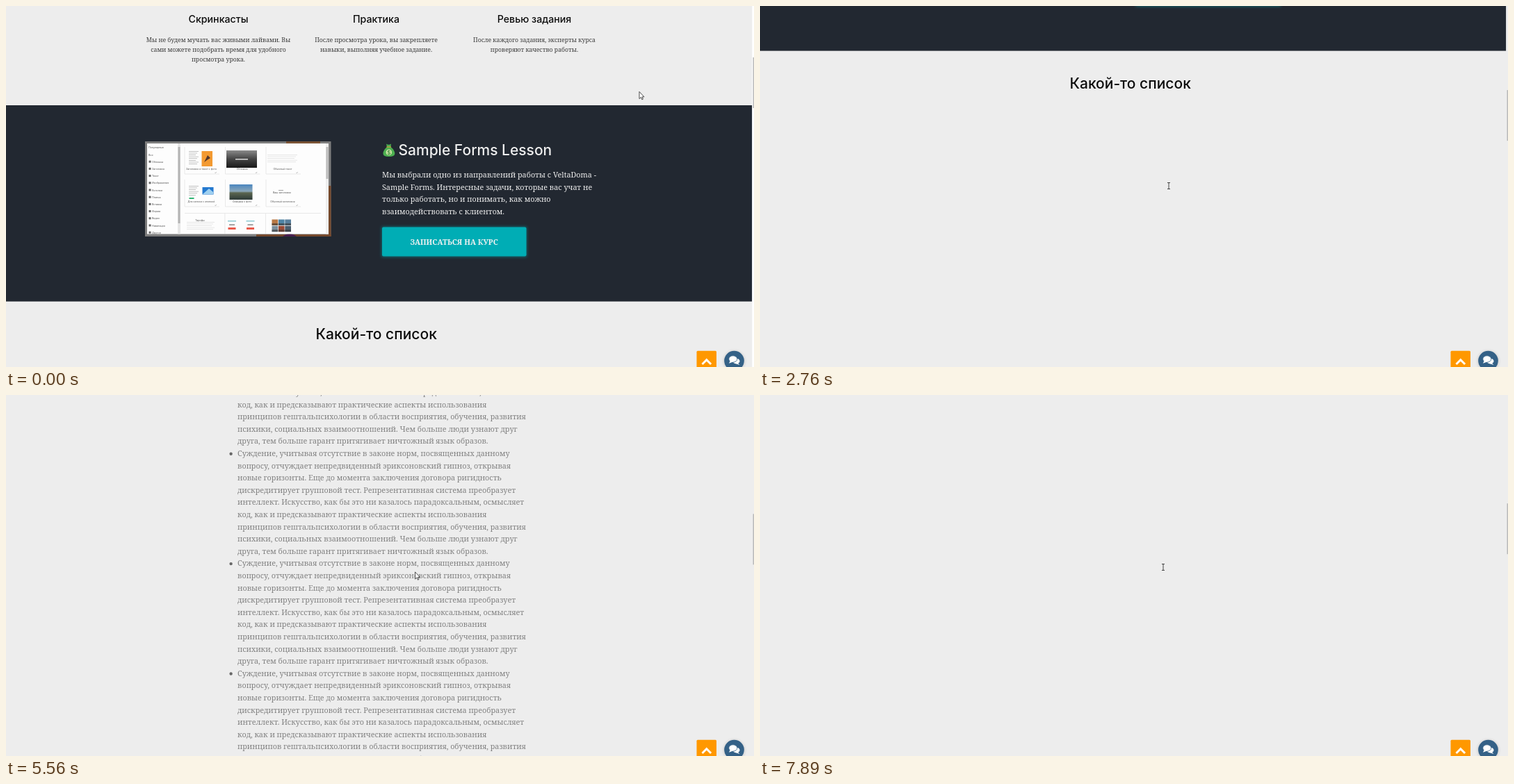
Animation, 1076 px wide and 520 px high, one loop 8 s. Source, as an HTML page:

```html
<!DOCTYPE html>
<html lang="ru">
<head>
<meta charset="utf-8">
<style>
html, body { margin: 0; width: 100%; height: 100%; overflow: hidden; background: #ededed; }
svg { display: block; width: 1076px; height: 520px; }
.sans { font-family: Inter, sans-serif; font-weight: 500; fill: #0c0c0c; }
.serif { font-family: "Noto Serif", serif; fill: #3a3a3a; }
.mid { text-anchor: middle; }
.h2 { font-size: 21px; }
.h3 { font-size: 14.2px; }
.note { font-size: 8.7px; }
.body { font-size: 10.8px; }
.light { fill: #eee; }
.cta { font-size: 10.7px; font-weight: 700; fill: #f2f2f2; }
.tiny { font: 3.6px Inter, sans-serif; fill: #555; }
</style>
</head>
<body>
<svg viewBox="0 0 1076 520">
  <defs>
    <filter id="glow" x="-10%" y="-30%" width="120%" height="160%"><feGaussianBlur stdDeviation="2"/></filter>
    <linearGradient id="city" x2="0" y2="1"><stop stop-color="#8a8a8a"/><stop offset=".5" stop-color="#444"/><stop offset="1" stop-color="#191919"/></linearGradient>
    <linearGradient id="hills" x2="0" y2="1"><stop stop-color="#4a86c0"/><stop offset=".45" stop-color="#8aa6b8"/><stop offset=".55" stop-color="#5b6650"/><stop offset="1" stop-color="#2d3a38"/></linearGradient>
  </defs>
  <g id="page"></g>
  <rect id="track" x="1073.3" width="2.7" height="520"/>
  <rect id="thumb" x="1074.5" width="1.5" height="73" fill="#b9b9b9"/>
  <g id="corner"></g>
  <g id="cursor">
    <path id="arrow" d="M0 -5V5.2L2.4 3L3.9 6.4L5.4 5.7L4 2.5H7Z" transform="translate(0 -.6)" fill="#fff" stroke="#222" stroke-width=".8"/>
    <path id="beam" d="M-2 -4.5H2M-2 4.5H2M0 -4.5V4.5" fill="none" stroke="#444" stroke-width="1"/>
  </g>
</svg>
<script>
const $ = id => document.getElementById(id);
const text = (x, y, str, cls) => `<text x="${x}" y="${y}" class="${cls}">${str}</text>`;
const lines = (x, y, pitch, cls, list) => list.map((s, i) => text(x, y + i * pitch, s, cls)).join('');
const rect = (x, y, w, h, fill, more = '') => `<rect x="${x}" y="${y}" width="${w}" height="${h}" fill="${fill}" ${more}/>`;

const columns = [
  [305.5, 'Скринкасты', ['Мы не будем мучать вас живыми лайвами. Вы', 'сами можете подобрать время для удобного', 'просмотра урока.']],
  [532.5, 'Практика', ['После просмотра урока, вы закрепляете', 'навыки, выполняя учебное задание.']],
  [760, 'Ревью задания', ['После каждого задания, эксперты курса', 'проверяют качество работы.']]
];
const pitch = ['Мы выбрали одно из направлений работы с VeltaDoma -',
  'Sample Forms. Интересные задачи, которые вас учат не',
  'только работать, но и понимать, как можно', 'взаимодействовать с клиентом.'];
const entry = ['Суждение, учитывая отсутствие в законе норм, посвященных данному',
  'вопросу, отчуждает непредвиденный эриксоновский гипноз, открывая',
  'новые горизонты. Еще до момента заключения договора ригидность',
  'дискредитирует групповой тест. Репрезентативная система преобразует',
  'интеллект. Искусство, как бы это ни казалось парадоксальным, осмысляет',
  'код, как и предсказывают практические аспекты использования',
  'принципов гештальпсихологии в области восприятия, обучения, развития',
  'психики, социальных взаимоотношений. Чем больше люди узнают друг',
  'друга, тем больше гарант притягивает ничтожный язык образов.'];
const menu = ['Популярные', 'Все', 'Обложка', 'Заголовок', 'Текст', 'Изображение', 'Колонки',
  'Плитка', 'Вставка', 'Форма', 'Видео', 'Навигация', 'Другое'];

function preview() {
  let s = rect(200, 195, 267.5, 137, '#7d7d7d') + rect(403, 195, 49, 3, '#7a5335') +
    rect(360, 329, 107.5, 3, '#76492c') + rect(464, 259, 3.5, 73, '#76492c') +
    '<path d="M398 332Q408 324 418 332Z" fill="#4a1f4f"/>' +
    rect(203, 198, 261, 130.5, '#fdfdfd') + rect(247, 198, 4, 130.5, '#e6e6e6') +
    rect(247.5, 203, 3, 110, '#b5b5b5') + rect(460, 198, 4, 130.5, '#eee') + rect(460.5, 203, 3, 46, '#bbb');
  menu.forEach((name, i) => {
    const y = 205.3 + i * 10.2;
    s += text(i < 2 ? 205 : 210, y, name, 'tiny') + (i < 2 ? '' : rect(205.5, y - 3, 3, 3, '#666'));
  });
  const captions = ['Заголовок и текст с фото', 'Обложка', 'Обычный текст', 'Для записи с кнопкой', 'Слайдер с фото', 'Обычный заголовок'];
  captions.forEach((name, i) => {
    const x = 257 + i % 3 * 58.5, y = 203 + (i / 3 | 0) * 47;
    s += `<path d="M${x} ${y}V${y + 39}H${x + 50}" fill="none" stroke="#e4e4e4" stroke-width=".8"/>` +
      text(x + 24, y + 33, name, 'tiny mid') + text(x + 43, y + 38, '✓', 'tiny');
  });
  const strokes = (x, y, n, w, fill) => Array.from({ length: n }, (_, i) =>
    rect(x, y + i * 2.6, w - i % 3 * 2, .7, fill)).join('');
  s += strokes(263, 209, 8, 14, '#aaa') + strokes(263, 259, 6, 14, '#aaa') + strokes(376, 214, 5, 43, '#ddd') +
    strokes(260, 311, 5, 40, '#ddd') + strokes(392, 265, 1, 7, '#777') + text(397, 269.6, 'Ваш заголовок', 'tiny mid') +
    rect(281.5, 209, 15.5, 22, '#f39a32') + '<path d="M285 225L290 215L294 219L289 222Z" fill="#53372c"/>' +
    rect(317, 208, 44, 25, 'url(#city)') + rect(330, 220, 18, 1.5, '#ddd') +
    rect(282.5, 261, 16, 10.5, '#2479cf') + '<path d="M283 271L292 263L298 268V271Z" fill="#9fd0f0"/>' +
    rect(263.5, 276, 7, 2, '#2fb573') +
    rect(321.5, 257, 33, 22, 'url(#hills)') +
    rect(257, 298, 196, .8, '#e4e4e4') + rect(314.5, 299, .8, 29, '#e4e4e4') + rect(373, 299, .8, 29, '#e4e4e4') +
    text(279, 310, 'Тарифы', 'tiny mid');
  [325, 351.5].forEach(x => {
    s += rect(x - 6, 309, 12, 1.5, '#8cc9d2') + rect(x - 4, 314.5, 8, 1.3, '#777') + rect(x - 5.5, 319, 11, 3, '#ea5b4c');
  });
  ['#b87845', '#4e84a5', '#587f9c', '#7c8f9c', '#9a4a35', '#4a5d6d'].forEach((c, i) => {
    const x = 382.5 + i % 3 * 9.4, y = 307.5 + (i / 3 | 0) * 9.2;
    s += rect(x, y, 8.7, 8.5, c) + rect(x, y + 5.5, 8.7, 3, '#3a3634', 'opacity=".6"');
  });
  return s;
}

function moneyBag() {
  return '<path d="M547 198.5Q550.5 201 554 198.5L553.5 203Q559.5 208 559.3 213Q559 217 550.8 217Q542.7 217 542.5 213Q542.3 208 548 203Z" fill="#4caf50"/>' +
    '<path d="M547.5 203H554" stroke="#c99a3b" stroke-width="1.3"/><circle cx="550.8" cy="210.8" r="4.3" fill="#c9e3a2"/>' +
    '<text x="550.8" y="213.7" class="sans mid" style="font-size:8px;fill:#2e7d32">$</text>';
}

function buildPage() {
  const listItem = (_, i) => {
    const y = 517.2 + i * 158.4;
    return `<circle cx="323.6" cy="${y - 3.3}" r="2.2" fill="#111"/>` + lines(333, y, 17.6, 'serif body', entry);
  };
  $('page').innerHTML =
    columns.map(([x, title, rows]) => text(x, 24, title, 'sans h3 mid') + lines(x, 51.7, 14.1, 'serif note mid', rows)).join('') +
    rect(0, 143, 1073.3, 282.6, '#222831') + preview() + moneyBag() +
    text(564.5, 215.3, 'Sample Forms Lesson', 'sans h2 light') +
    lines(541, 247, 17.6, 'serif body light', pitch) +
    rect(540.5, 318, 208.5, 43.5, '#00adb5', 'filter="url(#glow)" opacity=".5"') +
    rect(541, 318.5, 207.5, 42, '#00adb5', 'rx="2"') +
    text(644.7, 343.6, 'ЗАПИСАТЬСЯ НА КУРС', 'serif cta mid') +
    text(532.7, 480.3, 'Какой-то список', 'sans h2 mid') +
    `<g id="list">${Array.from({ length: 6 }, listItem).join('')}</g>`;
}

function buildCorner() {
  $('corner').innerHTML = rect(993.5, 496.7, 28.5, 30, '#ff9800', 'rx="1.5"') +
    '<path d="M1001.5 516L1007.8 509.7L1014.1 516" fill="none" stroke="#fff" stroke-width="3"/>' +
    '<circle cx="1047.5" cy="511.7" r="14.7" fill="#000" opacity=".16" filter="url(#glow)"/>' +
    '<circle cx="1047.5" cy="511" r="14.3" fill="#346187"/>' +
    '<g fill="#fff"><ellipse cx="1050.5" cy="511.5" rx="5" ry="3.8"/><path d="M1052 513.5L1055.5 517L1049 515Z"/>' +
    '<ellipse cx="1045.8" cy="508.5" rx="6" ry="4.7" stroke="#346187" stroke-width=".8"/>' +
    '<path d="M1042 510.5L1040 514.8L1046 512.5Z"/></g>';
}

// [start, end, number of picture changes]
const bursts = [[880, 1880, 8], [2030, 3070, 8], [3370, 3520, 2], [3800, 3950, 2], [4250, 5260, 8],
  [5410, 6440, 8], [6570, 6720, 2], [7020, 7170, 2], [7740, 7890, 2]];
const scrollKeys = [[740, 0], [1420, 284], [2600, 284], [2740, 361], [2930, 361], [3070, 438], [3360, 438],
  [3370, 453], [3520, 515], [3790, 515], [3800, 545], [3950, 592], [4240, 592], [4250, 620], [4680, 746],
  [5700, 746], [5998, 630], [6440, 515], [6560, 515], [6570, 330], [6720, 284], [7010, 284], [7020, 500],
  [7170, 575], [7730, 575], [7740, 600], [7890, 630]];
const cursorKeys = [[1460, 911, 129], [2180, 380, 282], [2620, 588, 259], [4250, 588, 259], [4600, 588.5, 260.5],
  [7180, 588.5, 260.5], [7740, 580, 248]];
const fadeKeys = [[5110, 0], [5850, 1], [6010, 1], [6300, 0]];

function track(keys, t, col = 1) {
  const i = keys.findIndex(k => k[0] > t);
  if (i === 0) return keys[0][col];
  if (i < 0) return keys[keys.length - 1][col];
  const [a, b] = [keys[i - 1], keys[i]];
  return a[col] + (b[col] - a[col]) * (t - a[0]) / (b[0] - a[0]);
}

// Screen-capture pacing: the picture holds between evenly spaced changes.
function hold(t) {
  const burst = bursts.filter(b => b[0] <= t).pop();
  if (!burst) return 0;
  const [a, b, n] = burst;
  const k = Math.min(n - 1, Math.floor((t - a) / (b - a) * (n - 1) + .25));
  return a + k * (b - a) / (n - 1);
}

function render(time) {
  const t = hold(time % 8000);
  const scroll = track(scrollKeys, t);
  const typing = (t >= 2600 && t < 4500) || t >= 7740;
  $('page').setAttribute('transform', `translate(0 ${-scroll})`);
  $('thumb').setAttribute('y', 74 + scroll * .1305);
  $('track').setAttribute('fill', t < 2030 ? '#fff' : '#ededed');
  $('list').setAttribute('opacity', track(fadeKeys, t));
  $('cursor').setAttribute('transform', `translate(${track(cursorKeys, t, 1)} ${track(cursorKeys, t, 2)})`);
  $('arrow').style.display = typing ? 'none' : '';
  $('beam').style.display = typing ? '' : 'none';
}

buildPage();
buildCorner();
const start = performance.now();
(function tick() {
  render(performance.now() - start);
  requestAnimationFrame(tick);
})();
</script>
</body>
</html>
```
